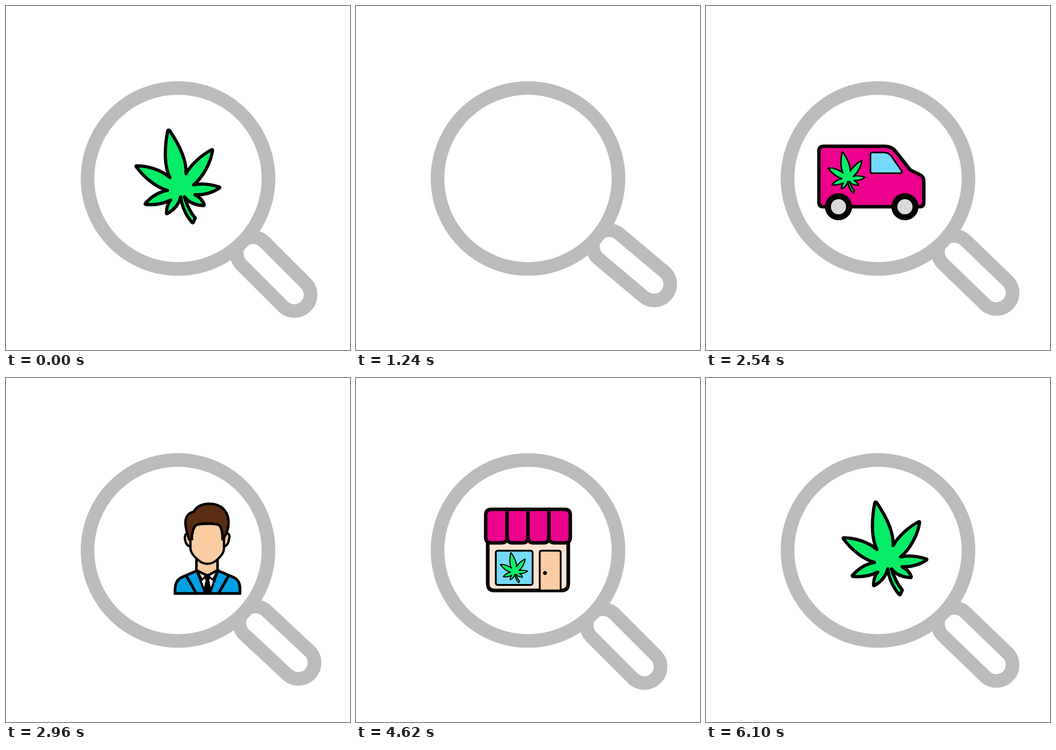
These frames come from a looping animation (748 px wide and 748 px high, 6160 ms). An HTML page:

```html
<!DOCTYPE html>
<html lang="en">
<head>
<meta charset="utf-8">
<title>Search loop</title>
<style>
  html, body { margin: 0; width: 100%; height: 100%; overflow: hidden; background: #fff; }
  svg { display: block; width: 100%; height: 100%; }
  .icon { stroke: #000; stroke-linejoin: round; visibility: hidden; }
  .icon:first-child { visibility: visible; }
  .grey { fill: #fff; stroke: #bbb; stroke-width: 29.5; }
  .leaf { fill: #06ec66; stroke-width: 7; }
  .pink { fill: #ec008c; }
  .glass { fill: #75d9f8; }
  .skin { fill: #fbcda3; }
  .suit { fill: #009fe3; }
  .line { fill: none; }
</style>
</head>
<body>
<svg viewBox="0 0 748 748">
  <defs>
    <clipPath id="lens"><circle cx="374" cy="375" r="182"/></clipPath>
    <path id="leaf" d="M355.500 270.500C377 302 393 335 391.500 364.500C402 345 425 324 447 312.500Q450 312 449 315
      C445 340 430 370 408 389C425 385 446 388 464 393.500Q466 395 463 396.500C447 407 428 411 411 410.500
      C420 415 428 423 431 432Q431 434.500 428 434C414 433 398 428 388 415C394 435 402 450 411.500 461L407.500 470.500
      Q406 472.500 404 470C392 456 382 436 380 415C376 430 366 443 350.500 451.500Q348.500 452 349 449
      C349 440 351 430 358 422C340 431 320 433 304 431.500Q301 430 304 428C316 415 333 404 351 401
      C325 394 300 372 283 349.500Q282 347 285 347.500C308 348 335 355 356.500 373C342 345 346 300 351.500 271.500
      Q353 268.500 355.500 270.500Z"/>
  </defs>

  <g id="handle" transform="rotate(45 374 375)">
    <rect class="grey" x="569" y="339.750" width="198" height="70.500" rx="35.250"/>
  </g>
  <circle class="grey" cx="374" cy="375" r="196.750"/>

  <g clip-path="url(#lens)">
    <g class="icon"><use href="#leaf" class="leaf"/></g>

    <g class="icon">
      <path class="pink" stroke-width="7.500" d="M271 305H404Q418 305 427 315L459.500 356.500L480 366.500Q489 371 489 380
        V427Q489 436.500 480 436.500H271Q261 436.500 261 427V315Q261 305 271 305Z"/>
      <path class="glass" stroke-width="3.500" d="M377 318.500H402Q412 318.500 418 326L440 357.500Q443.500 363.500 437 363.500
        H377Q373 363.500 373 360V322Q373 318.500 377 318.500Z"/>
      <use href="#leaf" class="leaf" transform="translate(321 362) scale(.441) translate(-373.500 -370.500)"/>
      <g fill="#dadada" stroke-width="13">
        <circle cx="303.500" cy="436.500" r="23"/>
        <circle cx="448" cy="436.500" r="23"/>
      </g>
    </g>

    <g class="icon">
      <g transform="translate(15.400)" stroke-width="6" stroke-linejoin="miter">
        <path class="suit" d="M290.500 468.500C290 449 293 439 306 433L337 419.500H385L417 433C430 439 433 449 431.500 468.500Z"/>
        <path class="line" d="M315 430L336 467M407 430L386 467"/>
        <path fill="#fff" stroke-width="5" d="M338 419L356 468H366L384 419Z"/>
        <path class="skin" stroke-width="5.500" d="M337 393V418L361 430L383 418V393Z"/>
        <path fill="#000" stroke="none" d="M361 427L368 433L365 440L371 468H351L357 440L354 433Z"/>
        <path class="line" stroke-width="4" d="M340 420L349 439L360 428L373 439L382 420"/>
        <path class="skin" stroke-width="5" d="M325 338C316 335 311 340 312 350Q314 365 325 367ZM396 338C406 335 411 340 408 350Q406 365 396 367Z"/>
        <path class="skin" stroke-width="5" d="M324 340V369C324 380 332 388 341 396Q350 404 361 404Q372 404 381 396
          C391 387 397 380 397 369V340L386 317H337Z"/>
        <path fill="#5b2d13" d="M327 353C327 336 331 322 338 319C351 315.500 372 315.500 385 319C391 322 394 336 394 353
          L401 340C409 323 409 303 400 290C389 273 364 270 345 277.500Q336 282 331 291C316 294 311 307 314 323Q316 337 322 353"
          stroke-width="5.500"/>
      </g>
    </g>

    <g class="icon">
      <path fill="#fbe3d3" stroke-width="8" d="M286.500 345V447Q286.500 462 301 462H447Q461.500 462 461.500 447V345Z"/>
      <rect class="glass" x="304" y="375.500" width="80" height="74.500" rx="4" stroke-width="4"/>
      <path class="skin" stroke-width="4" d="M399.500 460V379.500Q399.500 375.500 403.500 375.500H441Q445 375.500 445 379.500V460"/>
      <circle cx="411" cy="424" r="4.300" stroke="none"/>
      <use href="#leaf" class="leaf" transform="translate(343.300 412.500) scale(.324) translate(-373.500 -370.500)"/>
      <g class="pink" stroke-width="7.500">
        <path d="M328.500 285.500H295Q282 285.500 282 298V346Q282 358.500 294 358.500H316Q328.500 358.500 328.500 346Z"/>
        <path id="panel" d="M328.500 285.500H374V346Q374 358.500 362 358.500H340.500Q328.500 358.500 328.500 346Z"/>
        <use href="#panel" x="45.500"/>
        <path d="M419.500 285.500H453Q466 285.500 466 298V346Q466 358.500 454 358.500H432Q419.500 358.500 419.500 346Z"/>
      </g>
    </g>
  </g>
</svg>
<script>
  const HOLD = 1000, STEP = 60, STEPS = 10, TRAVEL = 770, SWING = 5;
  const SPAN = HOLD + (STEPS - 1) * STEP;
  const icons = [...document.querySelectorAll('.icon')];
  const handle = document.getElementById('handle');
  const ease = p => p < .5 ? 2 * p * p : 1 - 2 * (1 - p) ** 2;

  function place(icon, x) {
    icon.setAttribute('transform', `translate(${x})`);
    icon.style.visibility = 'visible';
  }

  function draw(now) {
    const t = now % (SPAN * icons.length);
    const i = Math.floor(t / SPAN);
    const step = Math.max(0, Math.floor((t % SPAN - HOLD) / STEP) + 1);
    const p = step / STEPS;
    const shift = TRAVEL * ease(p);

    icons.forEach(icon => icon.style.visibility = 'hidden');
    place(icons[i], -shift);
    if (step) place(icons[(i + 1) % icons.length], TRAVEL - shift);

    const swing = SWING * (1 - Math.abs(1 - 2 * p));
    handle.setAttribute('transform', `rotate(${45 - swing} 374 375)`);
  }

  const start = performance.now();
  (function tick() {
    draw(performance.now() - start);
    requestAnimationFrame(tick);
  })();
</script>
</body>
</html>
```
